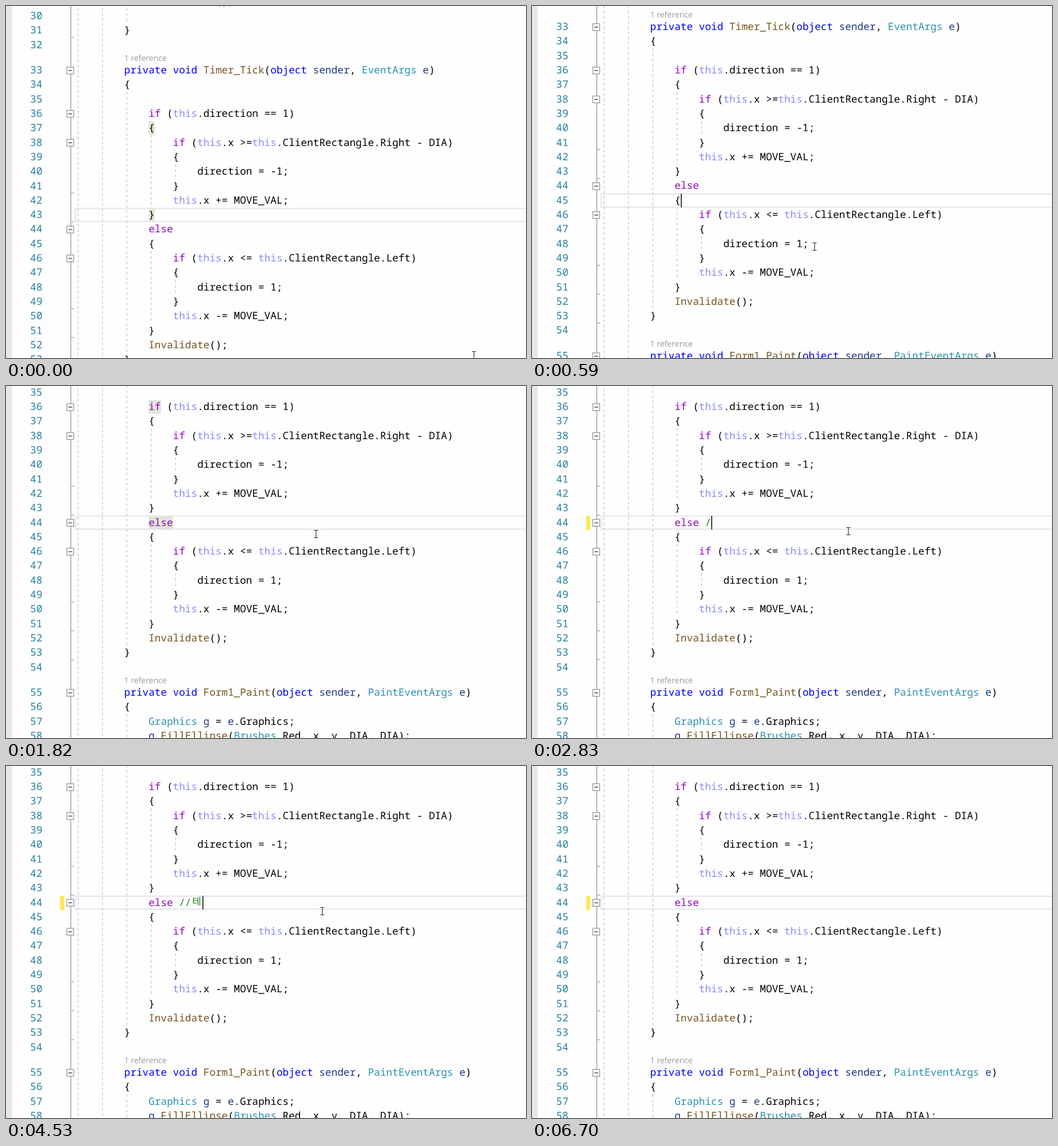
Animation of 909x616 px, one loop 6780 ms. Source, as an HTML page:

```html
<!DOCTYPE html>
<html lang="en">
<head>
<meta charset="utf-8">
<title>Code editor</title>
<style>
  html, body { margin: 0; width: 100%; height: 100%; overflow: hidden; background: #fefefe; }
  svg { display: block; width: 909px; height: 616px; }
  text { white-space: pre; text-rendering: geometricPrecision; }
  .code { font: 500 17.75px "Noto Sans Mono", "DejaVu Sans Mono", monospace; }
  .lens { font: 14.1px "Open Sans", "Noto Sans", sans-serif; fill: #999; }
  .ime { font: 17px "Noto Sans CJK KR", "Noto Sans CJK", "Noto Sans CJK JP", sans-serif; fill: #1a861a; }
</style>
</head>
<body>
<svg id="stage" viewBox="0 0 909 616"></svg>
<script>
const LOOP = 6780, CHAR = 10.65, LINE = 25.3, LENS = 19.3, WIDE = 19.4, TICK = 76;

const code = {
  29: [12, 'timer.Start();'],
  31: [8, '}'],
  33: [8, 'private void Timer_Tick(object sender, EventArgs e)'],
  34: [8, '{'],
  36: [12, 'if (this.direction == 1)'],
  37: [12, '{'],
  38: [16, 'if (this.x >=this.ClientRectangle.Right - DIA)'],
  39: [16, '{'],
  40: [20, 'direction = -1;'],
  41: [16, '}'],
  42: [16, 'this.x += MOVE_VAL;'],
  43: [12, '}'],
  44: [12, 'else'],
  45: [12, '{'],
  46: [16, 'if (this.x <= this.ClientRectangle.Left)'],
  47: [16, '{'],
  48: [20, 'direction = 1;'],
  49: [16, '}'],
  50: [16, 'this.x -= MOVE_VAL;'],
  51: [12, '}'],
  52: [12, 'Invalidate();'],
  53: [8, '}'],
  55: [8, 'private void Form1_Paint(object sender, PaintEventArgs e)'],
  56: [8, '{'],
  57: [12, 'Graphics g = e.Graphics;'],
  58: [12, 'g.FillEllipse(Brushes.Red, x, y, DIA, DIA);']
};

const palette = [
  [/^(private|void|object)$/, '#0000f5'],
  [/^this$/, '#8c8cf8'],
  [/^(if|else)$/, '#8f08c4'],
  [/^(EventArgs|PaintEventArgs|Graphics|Brushes)$/, '#2b91af'],
  [/^(sender|e|g)$/, '#1f377f']
];
const METHOD = '#74531f', NUMBER = '#237f9f', MARK = '#e1e5d6';

const col = c => 121.4 + c * CHAR;
const mid = n => 188 + (n - 36) * LINE + (n < 33 ? -LENS : n > 54 ? LENS : 0);

function add(parent, tag, attrs = {}, text) {
  const el = document.createElementNS('http://www.w3.org/2000/svg', tag);
  set(el, attrs);
  if (text !== undefined) el.textContent = text;
  parent.appendChild(el);
  return el;
}
function set(el, attrs) {
  for (const key in attrs) el.setAttribute(key, attrs[key]);
}
const rect = (parent, x, y, width, height, fill) => add(parent, 'rect', { x, y, width, height, fill });
const path = (parent, d, stroke, width) =>
  add(parent, 'path', { d, stroke, 'stroke-width': width, fill: 'none' });
const show = (el, on) => el.setAttribute('visibility', on ? 'visible' : 'hidden');

function colorOf(word, before, after) {
  const hit = before !== '.' && palette.find(([re]) => re.test(word));
  if (hit) return hit[1];
  return after === '(' && /\w/.test(word) ? METHOD : '#000';
}

function writeCode(parent, n, [indent, line]) {
  const row = add(parent, 'text', { class: 'code', x: col(indent), y: mid(n) + 6 });
  for (const m of line.matchAll(/\w+|\W+/g)) {
    const end = m.index + m[0].length;
    add(row, 'tspan', { fill: colorOf(m[0], line[m.index - 1], line[end]) }, m[0]);
  }
}

const stage = document.getElementById('stage');
rect(stage, 0, 0, 909, 616, '#fefefe');
rect(stage, 0, 0, 10.5, 616, '#e6e8e8');
const page = add(stage, 'g');

const lineBox = add(page, 'rect', {
  x: 121, width: 820, height: 22.8, fill: 'none', stroke: '#e8e7f0', 'stroke-width': 2.4
});
const mark = (c, n, len) => rect(page, col(c) + 0.3, mid(n) - 11.5, len * CHAR, 24, MARK);
const braceMarks = [mark(12, 37, 1), mark(12, 43, 1)];
const wordMarks = [mark(12, 36, 2), mark(12, 44, 4)];
const changeBar = rect(page, 94.5, mid(44) - 11.5, 7.5, 25, '#fbea59');

// indent guides: column, first line, last line
for (const [c, from, to] of [
  [0, 20, 65], [4, 20, 65], [8, 20, 30], [8, 35, 52], [8, 57, 65],
  [12, 38, 42], [12, 46, 50], [16, 40, 40], [16, 48, 48]
]) {
  const x = col(c) + 4.6;
  path(page, `M${x} ${mid(from) - 12.6}V${mid(to) + 12.6}`, '#cacaca', 1.4)
    .setAttribute('stroke-dasharray', '5 4');
}

// outlining margin
path(page, `M113.3 ${mid(20)}V${mid(65)}`, '#a6a6a6', 1.6);
for (const n of [31, 41, 43, 49, 51, 53]) path(page, `M113 ${mid(n) + 12.7}h6`, '#a6a6a6', 1.4);
for (const n of [33, 36, 38, 44, 46, 55]) {
  const y = mid(n) + 0.8;
  set(rect(page, 106.3, y - 6, 12, 12, '#fefefe'), { stroke: '#909090', 'stroke-width': 1.2 });
  path(page, `M109 ${y}h6.6`, '#444', 1.4);
}

for (let n = 29; n < 60; n++) {
  add(page, 'text', { class: 'code', x: 42.3, y: mid(n) + 6, fill: NUMBER }, n);
  if (code[n]) writeCode(page, n, code[n]);
}
for (const n of [33, 55]) add(page, 'text', { class: 'lens', x: 206.5, y: mid(n) - 16.4 }, '1 reference');

const slashes = add(page, 'text', { class: 'code', x: col(17), y: mid(44) + 6, fill: '#1a861a' });
const block = rect(page, 0, mid(44) - 11.5, WIDE + 0.6, 25, '#4a6484');
const glyphs = [0, 1, 2].map(i =>
  add(page, 'text', { class: 'ime', x: col(19) + 1.8 + i * WIDE, y: mid(44) + 4.5 }));
const caret = rect(page, 0, 0, 1.6, 24, '#111');
const pointer = path(stage, 'M-3.5-6.5H-1Q0-6.5 0-5.5Q0-6.5 1-6.5H3.5M0-6V6M-3.5 6.5H-1Q0 6.5 0 5.5Q0 6.5 1 6.5H3.5', '#222', 1.1);

// time, characters after "else", Hangul, composing
const typing = [
  [0, 0, '', 0], [2200, 1, '', 0], [2830, 2, '', 0], [2910, 3, '', 0],
  [3290, 3, 'ㅌ', 1], [3440, 3, '테', 1], [3520, 3, '텟', 1], [3600, 3, '테스', 1],
  [3750, 3, '테슽', 1], [3830, 3, '테스트', 1], [3980, 3, '테스트', 0],
  [4300, 3, '테스ㅌ', 1], [4380, 3, '테스', 0], [4530, 3, '테', 0],
  [4680, 3, '', 0], [4850, 2, '', 0], [5000, 1, '', 0], [5230, 0, '', 0]
];
const blinks = [360, 820, 1280, 1820, 2200, 2660, 2830, 5780, 6240, 6700];
const moves = [
  [0, 818, 611], [380, 506, 424], [532, 506, 424], [608, 494, 421], [760, 490, 405],
  [1216, 470, 249], [1368, 478, 243], [1824, 542, 259], [1976, 549, 256], [2052, 553, 254],
  [5852, 553, 254], [5928, 602, 300], [6004, 724, 410], [LOOP, 724, 410]
];

function pointerAt(t) {
  const q = Math.floor((t + 20) / TICK) * TICK;
  const i = Math.max(1, moves.findIndex(m => m[0] >= q));
  const [t0, x0, y0] = moves[i - 1], [t1, x1, y1] = moves[i];
  const k = (q - t0) / (t1 - t0);
  return [x0 + (x1 - x0) * k, y0 + (y1 - y0) * k];
}

function draw(t) {
  const scroll = (t >= 590) + (t >= 740);
  page.setAttribute('transform', `translate(0 ${-scroll * 3 * LINE})`);

  const line = t < 360 ? 43 : t < 1360 ? 45 : 44;
  lineBox.setAttribute('y', mid(line) - 10.8);
  braceMarks.forEach(m => show(m, t < 360));
  wordMarks.forEach(m => show(m, t >= 1590 && t < 2200));
  show(changeBar, t >= 2200);

  const [, typed, hangul, composing] = typing.filter(s => s[0] <= t).pop();
  slashes.textContent = '/'.repeat(Math.max(0, typed - 1));
  glyphs.forEach((g, i) => {
    g.textContent = hangul[i] || '';
    g.style.fill = composing && i === hangul.length - 1 ? '#0b4a22' : '';
  });
  show(block, composing);
  block.setAttribute('x', col(19) + (hangul.length - 1) * WIDE + 0.2);

  const x = line === 44 ? col(16 + typed) + hangul.length * WIDE : col(13);
  set(caret, { x: x + 0.3, y: mid(line) - 11.5 });
  show(caret, blinks.filter(b => b <= t).length % 2);

  pointer.setAttribute('transform', `translate(${pointerAt(t)})`);
  show(pointer, t < 6090);
}

const start = performance.now();
function frame() {
  draw((performance.now() - start) % LOOP);
  requestAnimationFrame(frame);
}
frame();
</script>
</body>
</html>
```
